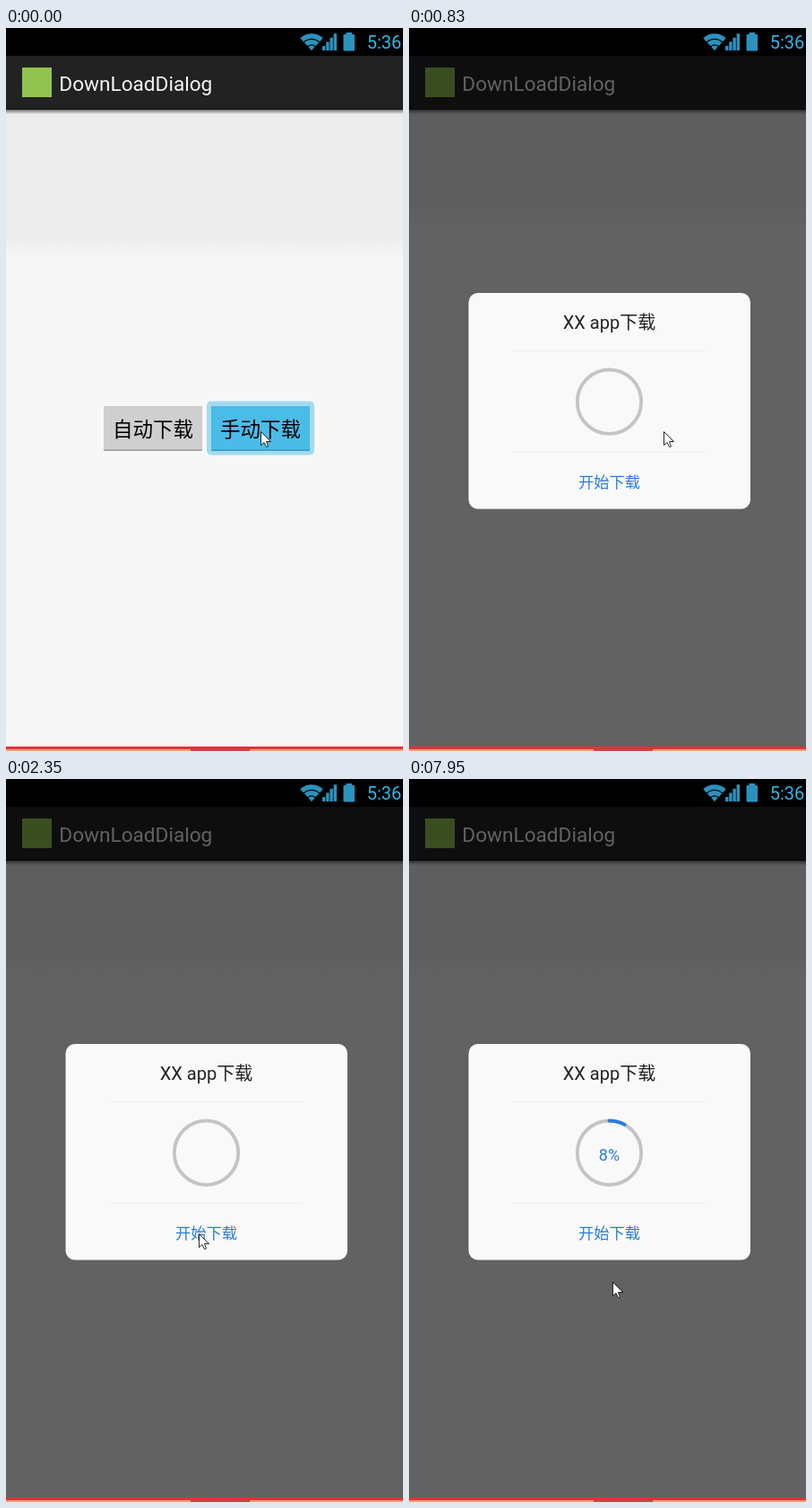
Animation, 443 px wide and 805 px high, one loop 8 s. Source, as an HTML page with a canvas:

```html
<!DOCTYPE html>
<html lang="zh-CN">
<head>
<meta charset="utf-8">
<title>Download dialog</title>
<style>
  html, body { margin: 0; width: 100%; height: 100%; overflow: hidden; background: #f7f7f7; }
  canvas { display: block; width: 443px; height: 805px; }
</style>
</head>
<body>
<canvas id="stage"></canvas>
<script>
const W = 443, H = 805, LOOP = 8000;
const FONT = 'Roboto, "Noto Sans CJK SC", "Noto Sans CJK", sans-serif';
const HOLO = '#33b5e5', ICON = '#2b92bd', BLUE = '#2a7edb';
const RELEASE = 530, OPEN = 680, DIMMED = 830;
const DOWNLOAD = 6930, PER_PERCENT = 127.5;

const canvas = document.getElementById('stage');
const ctx = canvas.getContext('2d');
const dpr = window.devicePixelRatio || 1;
canvas.width = W * dpr;
canvas.height = H * dpr;

// Pointer strokes: cubic curves walked in a few coarse steps
const STROKES = [
  { from: 1570, to: 2350, steps: 6, path: [[284, 449], [315, 510], [225, 560], [215, 506]] },
  { from: 5410, to: 5800, steps: 3, path: [[236, 554], [248, 620], [232, 632], [221, 578]] },
  { from: 5800, to: 6370, steps: 4, path: [[221, 578], [190, 570], [252, 580], [227, 560]] }
];

const easeOut = u => 1 - (1 - u) ** 1.7;

function bezier([a, b, c, d], u) {
  const v = 1 - u;
  return [0, 1].map(i => Math.round(
    a[i] * v ** 3 + 3 * b[i] * v * v * u + 3 * c[i] * v * u * u + d[i] * u ** 3));
}

function pointerAt(t) {
  const s = STROKES.findLast(s => s.from <= t) || STROKES[0];
  const k = Math.floor((t - s.from) / (s.to - s.from) * s.steps);
  return bezier(s.path, easeOut(Math.min(1, Math.max(0, k / s.steps))));
}

function rect(x, y, w, h, color) {
  ctx.fillStyle = color;
  ctx.fillRect(x, y, w, h);
}

function roundRect(x, y, w, h, r, color) {
  ctx.fillStyle = color;
  ctx.beginPath();
  ctx.roundRect(x, y, w, h, r);
  ctx.fill();
}

function text(str, x, y, size, color, align = 'center') {
  ctx.font = `${size}px ${FONT}`;
  ctx.textAlign = align;
  ctx.fillStyle = color;
  ctx.fillText(str, x, y);
}

function arc(cx, cy, r, from, sweep, width, color, cap = 'butt') {
  ctx.beginPath();
  ctx.arc(cx, cy, r, from, from + sweep);
  ctx.lineWidth = width;
  ctx.lineCap = cap;
  ctx.strokeStyle = color;
  ctx.stroke();
}

function fade(y0, y1, c0, c1) {
  const g = ctx.createLinearGradient(0, y0, 0, y1);
  g.addColorStop(0, c0);
  g.addColorStop(1, c1);
  return g;
}

function statusBar() {
  rect(0, 0, W, 31, '#000');
  for (let i = 0; i < 3; i++) {
    arc(341, 25, 2.8 + i * 6.6, -Math.PI / 2 - 0.75, 1.5, 5.3, ICON);
  }
  for (let i = 0; i < 4; i++) {
    const h = 5 + i * 4.6;
    rect(353 + i * 4.2, 25 - h, 3.4, h, ICON);
  }
  rect(379.5, 5, 6.5, 3, ICON);
  roundRect(376.5, 7, 12.5, 18.5, 1, ICON);
  text('5:36', 402.7, 23, 20, HOLO, 'left');
}

function actionBar() {
  rect(0, 31, W, 60, '#222');
  rect(0, 90, W, 1, '#111');
  rect(0, 91, W, 5, fade(91, 96, 'rgba(0,0,0,.5)', 'rgba(0,0,0,0)'));
  rect(18, 44, 33, 33, '#93c34f');
  text('DownLoadDialog', 59.3, 70, 22.6, '#f5f5f5', 'left');
}

function button(x, label, active) {
  if (active) roundRect(x - 5, 415.5, 120, 60, 5, '#a3dbf1');
  roundRect(x, 421, 110, 50, 1.5, active ? '#3fa0c6' : '#a9a9a9');
  roundRect(x, 421, 110, 48, 1.5, active ? '#4abce8' : '#cfcfcf');
  text(label, x + 55, 454.5, 22.5, '#000');
}

function dialog(t) {
  const cx = 223.5, cy = 416.2, r = 35.7, turn = Math.PI * 2;
  roundRect(66.5, 295, 314.5, 240.5, 10.5, '#f9f9f9');
  text('XX app下载', cx, 335, 20, '#222');
  for (const y of [359, 472]) rect(115, y, 216, 1, '#efefef');
  text('开始下载', cx, 511.5, 17.3, BLUE);
  arc(cx, cy, r, 0, turn, 3.8, '#c4c4c4');

  const percent = Math.floor((t - DOWNLOAD) / PER_PERCENT);
  if (percent < 0) return;
  if (percent > 0) arc(cx, cy, r, -turn / 4, turn * percent / 100, 3.8, BLUE, 'round');
  text(percent + '%', cx, 425, 18, BLUE);
}

function pointer([x, y]) {
  ctx.save();
  ctx.translate(x + 0.5, y + 0.5);
  ctx.beginPath();
  ctx.moveTo(0, 0);
  for (const [px, py] of [[0, 15], [3.5, 12], [6, 17], [8, 16.3], [6, 11], [11, 11]]) {
    ctx.lineTo(px, py);
  }
  ctx.closePath();
  ctx.fillStyle = '#fff';
  ctx.fill();
  ctx.lineWidth = 0.9;
  ctx.strokeStyle = '#111';
  ctx.stroke();
  ctx.restore();
}

function footer() {
  rect(0, 800, W, 3, '#e23238');
  rect(0, 803, W, 2, '#e8a070');
  rect(206, 803, 66, 2, '#c0484a');
}

function draw(t) {
  const open = t >= OPEN, dimmed = t >= DIMMED;
  // The seam between the two backdrop tones shifts as the dimming deepens
  const seam = dimmed ? 210 : open ? 453 : 245;
  ctx.setTransform(dpr, 0, 0, dpr, 0, 0);
  rect(0, 91, W, 709, fade(seam - 13, seam + 13, '#ececec', '#f7f7f7'));
  statusBar();
  actionBar();
  if (open) {
    rect(0, 31, W, 769, `rgba(0,0,0,${dimmed ? 0.6 : 0.505})`);
    dialog(t);
  } else {
    button(109, '自动下载', false);
    button(229, '手动下载', t < RELEASE);
  }
  footer();
  pointer(pointerAt(t));
}

const begin = performance.now();
function tick() {
  draw((performance.now() - begin) % LOOP);
  requestAnimationFrame(tick);
}
tick();
</script>
</body>
</html>
```
